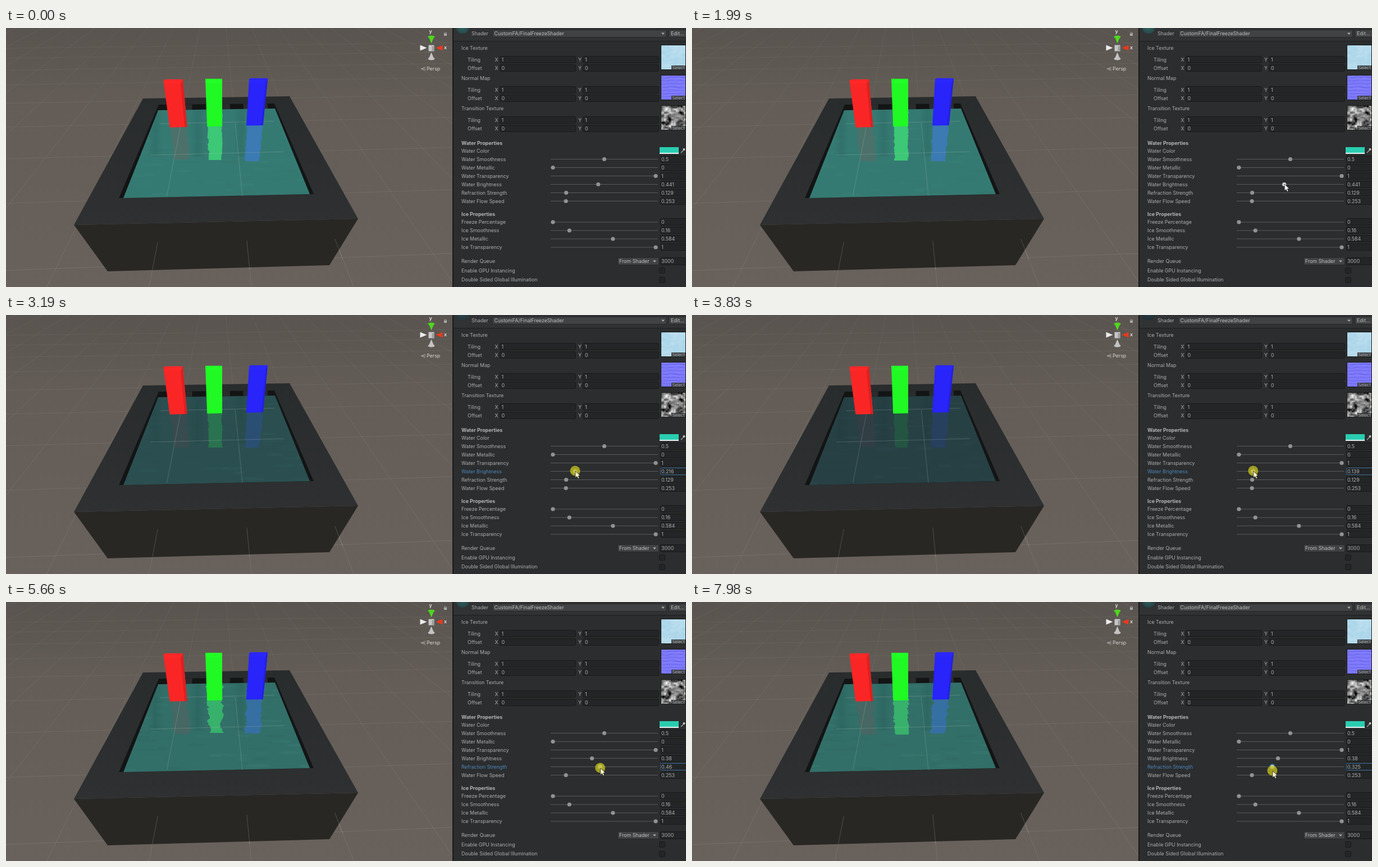
Write an HTML page with a canvas that moves like this. It is 1211 px wide and 463 px high and loops after 8000 ms.

```html
<!DOCTYPE html>
<html lang="en">
<head>
<meta charset="utf-8">
<title>Freeze shader inspector</title>
<style>
html, body { margin: 0; width: 100%; height: 100%; overflow: hidden; background: #2b2d2e; }
canvas { display: block; width: 100vw; height: 100vh; }
</style>
</head>
<body>
<canvas id="stage" width="1211" height="463"></canvas>
<script>
const W = 1211, H = 463, LOOP = 8000, PANEL = 796;
const FONT = 'Inter, Roboto, sans-serif';
const INK = '#adafaf', FIELD = '#232526', EDGE = '#191b1b', BUTTON = '#404243';
const stage = document.getElementById('stage').getContext('2d');
let c = stage;

// ---------- helpers ----------
const lerp = (a, b, u) => a + (b - a) * u;
const clamp = u => Math.max(0, Math.min(1, u));
const smooth = u => u * u * (3 - 2 * u);
const ramp = (t, t0, t1) => clamp((t - t0) / (t1 - t0));
const mix = (p, q, u) => [lerp(p[0], q[0], u), lerp(p[1], q[1], u)];
const rgb = v => `rgb(${v.map(Math.round).join()})`;

function hash(x, y) {
  const s = Math.sin(x * 127.1 + y * 311.7) * 43758.5453;
  return s - Math.floor(s);
}

function noise(x, y) {
  const i = Math.floor(x), j = Math.floor(y);
  const u = smooth(x - i), v = smooth(y - j);
  return lerp(lerp(hash(i, j), hash(i + 1, j), u),
              lerp(hash(i, j + 1), hash(i + 1, j + 1), u), v);
}

function track(keys, t) {
  return keys.reduce((v, [t1, b], i) =>
    i ? lerp(v, b, smooth(ramp(t, keys[i - 1][0], t1))) : b, 0);
}

function trace(points) {
  c.beginPath();
  points.forEach(p => c.lineTo(...p));
  c.closePath();
}

function poly(fill, ...points) {
  trace(points);
  c.fillStyle = fill;
  c.fill();
}

function line(color, x0, y0, x1, y1, width = 1) {
  c.beginPath();
  c.moveTo(x0, y0);
  c.lineTo(x1, y1);
  c.lineWidth = width;
  c.strokeStyle = color;
  c.stroke();
}

function rect(fill, x, y, w, h) {
  c.fillStyle = fill;
  c.fillRect(x, y, w, h);
}

function oval(fill, x, y, rx, ry = rx) {
  c.beginPath();
  c.ellipse(x, y, rx, ry, 0, 0, 7);
  c.fillStyle = fill;
  c.fill();
}

function box(fill, edge, x, y, w, h) {
  c.beginPath();
  c.roundRect(x + .5, y + .5, w - 1, h - 1, 2);
  c.fillStyle = fill;
  c.fill();
  c.lineWidth = 1;
  c.strokeStyle = edge;
  c.stroke();
}

function text(s, x, y, color = INK, weight = 400, size = 8.9) {
  c.font = `${weight} ${size}px ${FONT}`;
  c.textBaseline = 'middle';
  c.fillStyle = color;
  c.fillText(s, x, y + .5);
}

function layer(paint) {
  const canvas = document.createElement('canvas');
  canvas.width = W;
  canvas.height = H;
  c = canvas.getContext('2d');
  paint();
  c = stage;
  return canvas;
}

// ---------- ground grid in perspective ----------
const VX = 376, VY = -159;
const slopeOf = k => .098 + .293 * k;
const across = (s, y) => VX + s * (y - VY);
const depth = k => VY + 1 / (.00305 - .00044 * k);
const rowAt = (k, x) => depth(k) - (x - VX) * (depth(k) - VY) / 15000;

function floor() {
  const g = c.createLinearGradient(0, 0, 0, H);
  g.addColorStop(0, '#59544f');
  g.addColorStop(.3, '#645d57');
  g.addColorStop(1, '#69615b');
  rect(g, 0, 0, PANEL, H);
  const fade = c.createLinearGradient(0, 0, 0, H);
  fade.addColorStop(0, 'rgba(185,190,188,.07)');
  fade.addColorStop(1, 'rgba(185,190,188,.16)');
  for (let k = -14; k < 15; k++) line(fade, across(slopeOf(k), 0), 0, across(slopeOf(k), H), H);
  for (let k = -5; k < 4; k++) line(fade, 0, rowAt(k, 0), PANEL, rowAt(k, PANEL));
}

// ---------- pool ----------
// corners: back left, back right, front right, front left
const RIM = [[244, 126], [505, 122], [627, 341], [121, 352]];
const HOLE = [[272, 137], [478, 135], [548, 297], [201, 304]];
const WATER = [[271, 147], [479, 144], [541, 297], [209, 304]];
const BASE = [[576, 424], [181, 435]];

function pool() {
  poly('#282724', RIM[3], RIM[2], ...BASE);
  const top = c.createLinearGradient(0, 122, 0, 352);
  top.addColorStop(0, '#292c2d');
  top.addColorStop(1, '#2e3031');
  poly(top, ...RIM);
  poly('#131515', ...HOLE);
  for (let i = 0; i < 3; i++) {
    const wall = u => [mix(HOLE[0], HOLE[1], u), mix(WATER[0], WATER[1], u)];
    const [a, b] = wall(.08 + i * .325), [d, e] = wall(.29 + i * .325);
    poly('#2a2c2d', a, d, e, b);
  }
}

function poolLines() {
  const ink = 'rgba(190,200,195,.25)', reach = .31;
  for (let k = -1; k < 2; k++) {
    const s = slopeOf(k), front = 380 - 3 * k, end = 432 - 18 * Math.max(0, k);
    if (Math.abs(s) < reach) line(ink, across(s, 170), 170, across(s, 300), 300);
    line(ink, across(s, front), front, across(s, end), end);
  }
  for (const k of [0, 1]) {
    const x0 = across(-reach, depth(k)), x1 = across(reach, depth(k));
    line(ink, x0, rowAt(k, x0), x1, rowAt(k, x1));
  }
}

// ---------- pillars ----------
const PILLARS = [
  { hue: 'red', x: 280, w: 35, body: [250, 38, 38] },
  { hue: 'green', x: 355, w: 30, body: [32, 249, 36] },
  { hue: 'blue', x: 433, w: 33, body: [40, 36, 250] },
];
const edge = (x, y) => x + (385 - x) * .00125 * (y - 91);
const surface = x => 183.5 - .0205 * x;
const shade = (color, f) => rgb(color.map(v => v * f));

function pillar({ x, w, body }) {
  const right = x + w, side = w - 30, top = 95.5 - .012 * x;
  const at = (px, y) => [edge(px, y), y];
  const foot = px => at(px, surface(px));
  poly(shade(body, 1), at(x, top + 1), at(right, top), foot(right), foot(x));
  poly(shade(body, .88), at(right - side, top + 7), at(right, top), foot(right), foot(right - side));
  poly(shade(body, 1.05), at(x, top + 1), at(x + side, top - .5), at(right, top - .5),
    at(right - side, top + 7), at(x + 1, top + 8));
}

// Colours that follow brightness: base plus gain * brightness.
const TINT = {
  water: [[33, 38, 47], [45, 191, 151]],
  green: [[25, 33, 43], [80, 378, 169]],
  blue: [[29, 38, 55], [67, 191, 280]],
  red: [[37, 39, 50], [88, 168, 128]],
};
const tint = (name, b) => rgb(TINT[name][0].map((v, i) => v + TINT[name][1][i] * b));

function sunk({ hue, x, w }, n, flow, b, refraction) {
  const sway = 1.2 + refraction * 19;
  const wave = (y, seed) =>
    (noise(y / 6.5 - flow, seed) * .6 + noise(y / 2.8 - flow * 1.6, seed + 40) * .4 - .5) * sway;
  const end = 236.5 + (noise(flow, n * 9) - .5) * (2 + refraction * 10);
  c.fillStyle = tint(hue, b);
  for (let y = 150; y < end; y++) {
    const x0 = edge(x, y) + 1 + wave(y, n * 7);
    const x1 = edge(x + w, y) - .5 + wave(y, n * 7 + 3);
    c.fillRect(x0, y, Math.max(0, x1 - x0), 1);
  }
}

function water(t, b, refraction) {
  const flow = t * .0021;
  c.save();
  trace(WATER);
  c.clip();
  rect(tint('water', b), 200, 140, 350, 170);

  for (const { x } of PILLARS) {
    const g = c.createLinearGradient(x - 28, 0, x, 0);
    g.addColorStop(0, 'rgba(10,35,40,0)');
    g.addColorStop(.5, 'rgba(10,35,40,.1)');
    g.addColorStop(1, 'rgba(10,35,40,0)');
    rect(g, x - 28, 146, 28, 84);
  }

  // drifting ripples
  for (let i = 0; i < 90; i++) {
    const near = hash(i, 2);
    const x = 205 + 345 * ((hash(i, 1) + flow * .006) % 1);
    const glow = Math.sin(flow * 1.3 + i * 2.4) * (.02 + .06 * refraction);
    const fill = glow > 0 ? `rgba(120,215,205,${glow})` : `rgba(5,40,45,${-glow})`;
    oval(fill, x, 146 + 158 * near, 8 + 16 * hash(i, 3), 1 + 2.2 * near);
  }
  PILLARS.forEach((p, n) => sunk(p, n, flow, b, refraction));
  c.restore();
}

// ---------- gizmo ----------
function gizmo() {
  const x = 757.5, y = 35.5;
  ['#e83a1d', '#c4c4c4', '#ececec', '#4fd61e'].forEach((color, i) => {
    c.save();
    c.translate(x, y);
    c.rotate(i * Math.PI / 2);
    poly(color, [8, 0], [20, -5], [20, 5]);
    if (i % 2) oval(color, 19.5, 0, 2.5, 6);
    c.restore();
  });
  rect('#c6c6c6', x - 5, y - 5, 10, 11);
  rect('#9d9d9d', x + 1, y - 3, 4, 9);
  text('y', x - 4, 6, '#e4e4e4', 600);
  text('x', x + 22.5, 34.5, '#e4e4e4', 600);
  rect('#a9a9a9', 780, 10, 5, 4);
  c.beginPath();
  c.arc(782.5, 10, 1.9, Math.PI, 0);
  c.strokeStyle = '#a9a9a9';
  c.stroke();
  for (const d of [-3, 0, 3]) line('#c4c4c4', 739.5, 73, 747, 73 + d, .7);
  text('Persp', 749, 72.5, '#d4d4d4');
}

// ---------- inspector ----------
const X0 = 974, SPAN = 183;
const GROUPS = [
  { title: 'Water Properties', head: 205.5, y: 234.5, rows: ['Water Smoothness', 'Water Metallic',
    'Water Transparency', 'Water Brightness', 'Refraction Strength', 'Water Flow Speed'] },
  { title: 'Ice Properties', head: 333, y: 347, rows: ['Freeze Percentage', 'Ice Smoothness',
    'Ice Metallic', 'Ice Transparency'] },
];
const VALUES = {
  'Water Smoothness': .5, 'Water Transparency': 1, 'Water Flow Speed': .253,
  'Ice Smoothness': .16, 'Ice Metallic': .584, 'Ice Transparency': 1,
};
const LIMITS = { 'Water Flow Speed': 2 };

function texture(x, y, color) {
  const size = 43;
  rect('#1a1c1c', x, y, size + 2, size + 2);
  for (let j = 0; j < size; j++) {
    for (let i = 0; i < size; i++) rect(rgb(color(i, j)), x + 1 + i, y + 1 + j, 1, 1);
  }
  rect('rgba(50,52,53,.9)', x + 19, y + 37, 25, 7);
  text('Select', x + 20.5, y + 41, INK, 400, 7.5);
}

const icy = (i, j) => {
  const n = noise(i / 11, j / 6) * .6 + noise(i / 4, j / 3) * .4;
  return [162 + 32 * n, 208 + 18 * n, 230 + 11 * n];
};
const bumpy = (i, j) => {
  const n = Math.sin(j * 1.1 + 3 * noise(i / 8, j / 7)) * noise(i / 6, j / 3);
  return [122 + 16 * n, 118 + 16 * n, 247 + 7 * n];
};
const cloudy = (i, j) => {
  const n = noise(i / 7 + 5, j / 6) * .6 + noise(i / 3, j / 3 + 9) * .4;
  return Array(3).fill(255 * clamp(.46 + (n - .5) * 1.15));
};

const arrow = (x, y) => poly('#a9abab', [x - 3, y - 1.5], [x + 3, y - 1.5], [x, y + 2]);

function mapBlock(label, y, color) {
  text(label, 811, y);
  [['Tiling', 1], ['Offset', 0]].forEach(([name, value], i) => {
    const row = y + 21 + 15 * i;
    text(name, 822, row);
    [['X', 870.5], ['Y', 1019]].forEach(([axis, x]) => {
      text(axis, x, row);
      box(FIELD, EDGE, Math.round(x + 8), row - 7, 136, 13);
      text(value, x + 12, row);
    });
  });
  texture(1166, y - 6, color);
}

function panel() {
  rect('#2b2d2e', PANEL, 0, W - PANEL, H);
  rect('#303233', PANEL, 0, W - PANEL, 23);
  rect('#1c1e1e', PANEL, 23, W - PANEL, 1);
  rect('#191a1a', PANEL - 1, 0, 2, H);
  text('Shader', 829, 10);
  box(BUTTON, '#272929', 866, 3, 311, 14);
  text('CustomFA/FinalFreezeShader', 869.5, 9.5, '#bfc1c1');
  arrow(1170, 10);
  box(BUTTON, '#272929', 1180, 3, 40, 14);
  text('Edit...', 1184, 9.5, '#bfc1c1');

  [['Ice Texture', icy], ['Normal Map', bumpy], ['Transition Texture', cloudy]]
    .forEach(([label, color], i) => mapBlock(label, 36 + 54 * i, color));

  text('Water Color', 811, 220);
  rect('#2acdb1', 1164, 213, 34, 12);
  rect('#e8f5f2', 1164, 223, 34, 2);
  line('#a9abab', 1202, 223, 1207, 218, 1.3);
  oval('#c4c6c6', 1207.5, 217, 2);

  text('Render Queue', 811, 417);
  box(BUTTON, '#272929', 1089, 410, 74, 14);
  text('From Shader', 1092, 416.5, '#bfc1c1');
  arrow(1155, 417);
  box(FIELD, EDGE, 1165, 410, 60, 14);
  text('3000', 1167, 417);
  ['Enable GPU Instancing', 'Double Sided Global Illumination'].forEach((label, i) => {
    text(label, 811, 433.5 + 16.5 * i);
    box(FIELD, EDGE, 1163, 428 + 17 * i, 11, 11);
  });
}

function sliders(live, focus, hover) {
  for (const { title, head, y: first, rows } of GROUPS) {
    text(title, 811, head, '#b4b6b6', 700);
    rows.forEach((name, i) => {
      const y = first + 15 * i, on = name === focus;
      const v = live[name] ?? VALUES[name] ?? 0;
      const x = X0 + SPAN * v / (LIMITS[name] ?? 1);
      text(name, 811, y, on ? '#4f86bd' : INK);
      line('#595b5b', 970, y, 1161, y);
      if (on) oval('#28587c', x, y, 5.8);
      oval(on || name === hover ? '#cfd8dc' : '#919393', x, y, 3.6);
      box(FIELD, on ? '#34699a' : EDGE, 1165, Math.round(y - 7), 60, 13);
      text(+v.toFixed(3), 1167, y);
    });
  }
}

function pointer(x, y, held) {
  if (held) oval('rgba(196,190,28,.78)', x - .5, y - .5, 9);
  trace([[0, 0], [0, 12], [2.8, 9.5], [4.8, 13.6], [6.9, 12.6], [5, 8.7], [8.6, 8.4]]
    .map(([dx, dy]) => [x + dx, y + dy]));
  c.fillStyle = held ? '#fffbd0' : '#fff';
  c.strokeStyle = '#222';
  c.lineWidth = .8;
  c.fill();
  c.stroke();
}

// ---------- motion ----------
const PRESS = 2470, RELEASE = 4240, GRAB = 4710;
const BRIGHT = [[PRESS, .441], [2830, .7], [3190, .216], [3510, .12], [3750, .12], [RELEASE, .38]];
const REFRACT = [[GRAB, .129], [5660, .46], [6060, .6], [6940, .088], [7180, .06], [7980, .325]];

// Screen updates every 80 ms, with one longer pause.
function tick(t) {
  if (t < 70) return 0;
  const start = t < 5420 ? 70 : 5420;
  const q = start + 80 * Math.floor((t - start) / 80);
  return q >= 3510 && q < 3750 ? 3510 : q;
}

function cursor(t, b, r) {
  const enter = 1 - (1 - ramp(t, 70, 1990)) ** 2;
  const cross = smooth(ramp(t, RELEASE, 4550));
  return [
    X0 + .5 + SPAN * lerp(b, r, cross) + 76 * (1 - enter),
    279 + 179 * (1 - enter) + 18 * cross + 5 * ramp(t, 6900, LOOP),
  ];
}

const backLayer = layer(() => { floor(); pool(); gizmo(); });
const frontLayer = layer(() => { poolLines(); PILLARS.forEach(pillar); panel(); });

function draw(now) {
  const t = tick(now % LOOP);
  const b = track(BRIGHT, t), r = track(REFRACT, t);
  const held = t >= PRESS && t < RELEASE || t >= GRAB;
  const focus = t >= GRAB ? 'Refraction Strength' : t >= PRESS ? 'Water Brightness' : '';
  const hover = t > 4500 ? 'Refraction Strength' : t > 1800 && t < RELEASE ? 'Water Brightness' : '';

  c.drawImage(backLayer, 0, 0);
  water(t, b, r);
  c.drawImage(frontLayer, 0, 0);
  const ball = c.createRadialGradient(812, -3, 2, 813, -2, 12);
  ball.addColorStop(0, tint('water', b * .75));
  ball.addColorStop(1, tint('water', b * .4));
  oval(ball, 813, -2, 12);
  sliders({ 'Water Brightness': b, 'Refraction Strength': r }, focus, hover);
  if (t >= 70) pointer(...cursor(t, b, r), held);
}

function loop() {
  draw(performance.now());
  requestAnimationFrame(loop);
}
loop();
</script>
</body>
</html>
```
